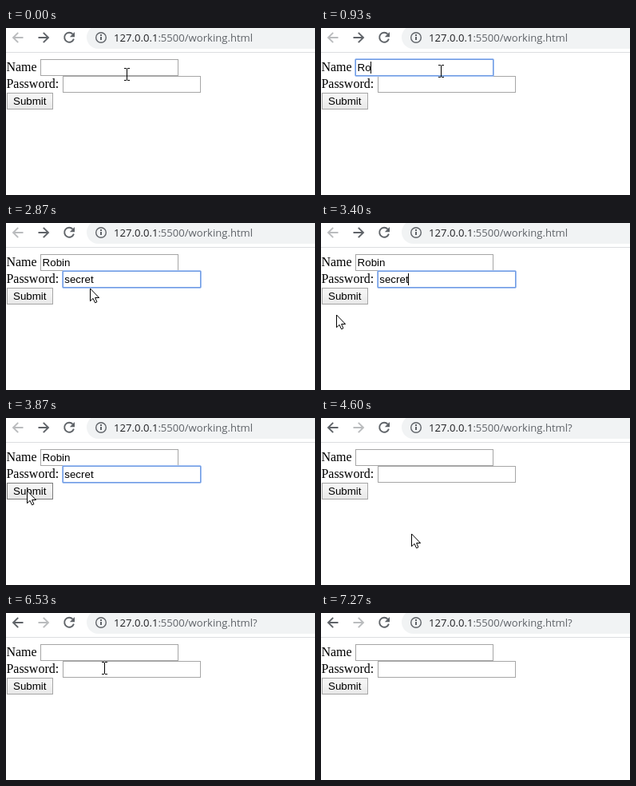
These frames come from a looping animation (387 by 209 pixels, 7.54 s). An HTML page:

```html
<!DOCTYPE html>
<html lang="en">
<head>
<meta charset="utf-8">
<title>Form submit</title>
<style>
  html, body { margin: 0; width: 100%; height: 100%; overflow: hidden; background: #fff; }
  svg { display: block; width: 387px; height: 209px; }
  .url { font: 13.1px "Open Sans", "Noto Sans", sans-serif; fill: #5f6368; }
  .host { fill: #202124; }
  .label { font: 16px "Liberation Serif", serif; }
  .field { font: 13.333px "Liberation Sans", sans-serif; }
  .icon { fill: none; stroke: #5f6368; stroke-width: 1.9; }
  .crisp { shape-rendering: crispEdges; }
  .box { fill: #fff; stroke: #a6a6a6; }
  .ring { fill: none; stroke: #a3c1f3; }
  .ring + .ring { stroke: #6f9be3; }
  #address { fill: #f1f3f4; }
  #address.hover { fill: #e8eaed; }
  #button { fill: url(#shade); stroke: #a6a6a6; }
  #button.hover { stroke: #7b7b7b; }
</style>
</head>
<body>
<svg viewBox="0 0 387 209">
  <linearGradient id="shade" x2="0" y2="1">
    <stop offset=".3" stop-color="#f4f4f4"/>
    <stop offset="1" stop-color="#e8e8e8"/>
  </linearGradient>

  <!-- toolbar -->
  <rect id="address" x="101" y="-3" width="320" height="29" rx="14.5"/>
  <rect class="crisp" y="30" width="387" height="1" fill="#dcdde0"/>
  <path id="back" class="icon" d="M21.5 12H9.3M15.2 5.8L9 12l6.2 6.2"/>
  <path id="forward" class="icon" d="M40.5 12h12.2M46.8 5.8L53 12l-6.2 6.2"/>
  <path class="icon" d="M83.6 7.6A6 6 0 1 0 84.9 13.6"/>
  <path d="M86 5v6.2h-6.2z" fill="#5f6368"/>
  <circle class="icon" cx="119" cy="12" r="6.3" style="stroke-width:1.4"/>
  <path class="crisp" d="M118 11h2v4h-2zM118 8h2v2h-2z" fill="#5f6368"/>
  <text class="url" x="135" y="17"><tspan class="host">127.0.0.1</tspan>:5500/working.html<tspan id="query">?</tspan></text>

  <!-- form -->
  <text class="label" x=".4" y="54">Name</text>
  <text class="label" x=".4" y="75">Password:</text>
  <g class="crisp">
    <rect class="box" x="43.5" y="39.5" width="172" height="20"/>
    <rect class="box" x="71.5" y="60.5" width="172" height="20"/>
    <rect id="button" x="1.5" y="81.5" width="57" height="20"/>
  </g>
  <text class="field" x="9" y="96">Submit</text>
  <g id="focus">
    <rect class="ring" x="-.5" y="-.5" width="174" height="22" rx="1.5"/>
    <rect class="ring" x=".5" y=".5" width="172" height="20"/>
  </g>
  <text id="name" class="field" x="45.6" y="54"></text>
  <text id="pass" class="field" x="73.3" y="75"></text>
  <rect id="caret" class="crisp" width="1" height="15"/>

  <!-- pointer -->
  <path id="arrow" d="M.5 0V15.7L4.1 12.4 6.5 17.8 8.9 16.8 6.6 11.5H11.6Z" fill="#fff" stroke="#000"/>
  <path id="beam" class="crisp" d="M-3-8h3v1h1v-1h3v1h-3v14h3v1h-3v-1h-1v1h-3v-1h3v-14h-3z"/>
</svg>
<script>
const LOOP = 7540, BLINK = 530, KEY_GAP = 120, SUBMIT = 4270;
const $ = id => document.getElementById(id);

const fields = [
  { id: "name", text: "Robin", focus: 140, firstKey: 790, x: 43, y: 39 },
  { id: "pass", text: "secret", focus: 1400, firstKey: 1630, x: 71, y: 60 }
];

// pointer strokes, each a curve from the last stop, bent towards "via"
const home = [151, 58];
const strokes = [
  { from: 0, until: 200, to: [150, 54] },
  { from: 2730, until: 3530, via: [6.5, 144], to: [19, 106] },
  { from: 3530, until: 3870, to: [26, 91] },
  { from: 4200, until: 5000, via: [39, 231], to: [346, 25] },
  { from: 5000, until: 5130, to: [317, 13] },
  { from: 5400, until: 5730, via: [330, 12], to: [317, 11] },
  { from: 5800, until: 5870, to: [314, 13] },
  { from: 5870, until: 6530, via: [230, 55], to: [123, 69] },
  { from: 6600, until: 7270, via: [190, 10], to: [94, 212] }
];

function pointAt(t) {
  let at = home;
  for (const { from, until, via, to } of strokes) {
    if (t < from) break;
    const k = Math.min(1, (t - from) / (until - from));
    at = at.map((a, i) => {
      const mid = via ? via[i] : (a + to[i]) / 2;
      return (1 - k) ** 2 * a + 2 * k * (1 - k) * mid + k * k * to[i];
    });
  }
  return at.map(Math.round);
}

const inside = (x, y, l, t, w, h) => x >= l && x < l + w && y >= t && y < t + h;
const show = (id, on) => $(id).setAttribute("visibility", on ? "visible" : "hidden");
const move = (id, x, y) => $(id).setAttribute("transform", `translate(${x} ${y})`);

function typedCount(field, t) {
  const count = Math.floor((t - field.firstKey) / KEY_GAP) + 1;
  return Math.max(0, Math.min(field.text.length, count));
}

function drawForm(t) {
  const sent = t >= SUBMIT;
  for (const f of fields) {
    $(f.id).textContent = sent ? "" : f.text.slice(0, typedCount(f, t));
  }

  const field = sent ? null : fields.findLast(f => t >= f.focus);
  show("focus", field);
  show("caret", false);
  if (field) {
    const count = typedCount(field, t);
    const lastInput = count ? field.firstKey + (count - 1) * KEY_GAP : field.focus;
    const text = $(field.id);
    const width = count ? text.getComputedTextLength() : 0;
    show("caret", Math.floor((t - lastInput) / BLINK) % 2 === 0);
    move("caret", Math.floor(+text.getAttribute("x") + width), field.y + 3);
    move("focus", field.x, field.y);
  }

  show("query", sent);
  $("back").style.stroke = sent ? "#5f6368" : "#babcbe";
  $("forward").style.stroke = sent ? "#babcbe" : "#5f6368";
}

function drawPointer(t) {
  const [x, y] = pointAt(t);
  const overText = inside(x, y, 130, 0, 257, 25) ||
    fields.some(f => inside(x, y, f.x, f.y, 173, 21));
  show("beam", overText);
  show("arrow", !overText);
  move("beam", x, y);
  move("arrow", x, y);
  $("address").classList.toggle("hover", inside(x, y, 101, 0, 286, 26));
  $("button").classList.toggle("hover", t < SUBMIT && inside(x, y, 1, 81, 58, 21));
}

// the picture advances 15 times a second, on a 10 ms clock
function stepTime(ms) {
  const step = Math.floor((ms + 3.4) * 0.015);
  return Math.round(step * 20 / 3) * 10;
}

const start = performance.now();
function draw() {
  const t = stepTime((performance.now() - start) % LOOP);
  drawForm(t);
  drawPointer(t);
  requestAnimationFrame(draw);
}
draw();
</script>
</body>
</html>
```
